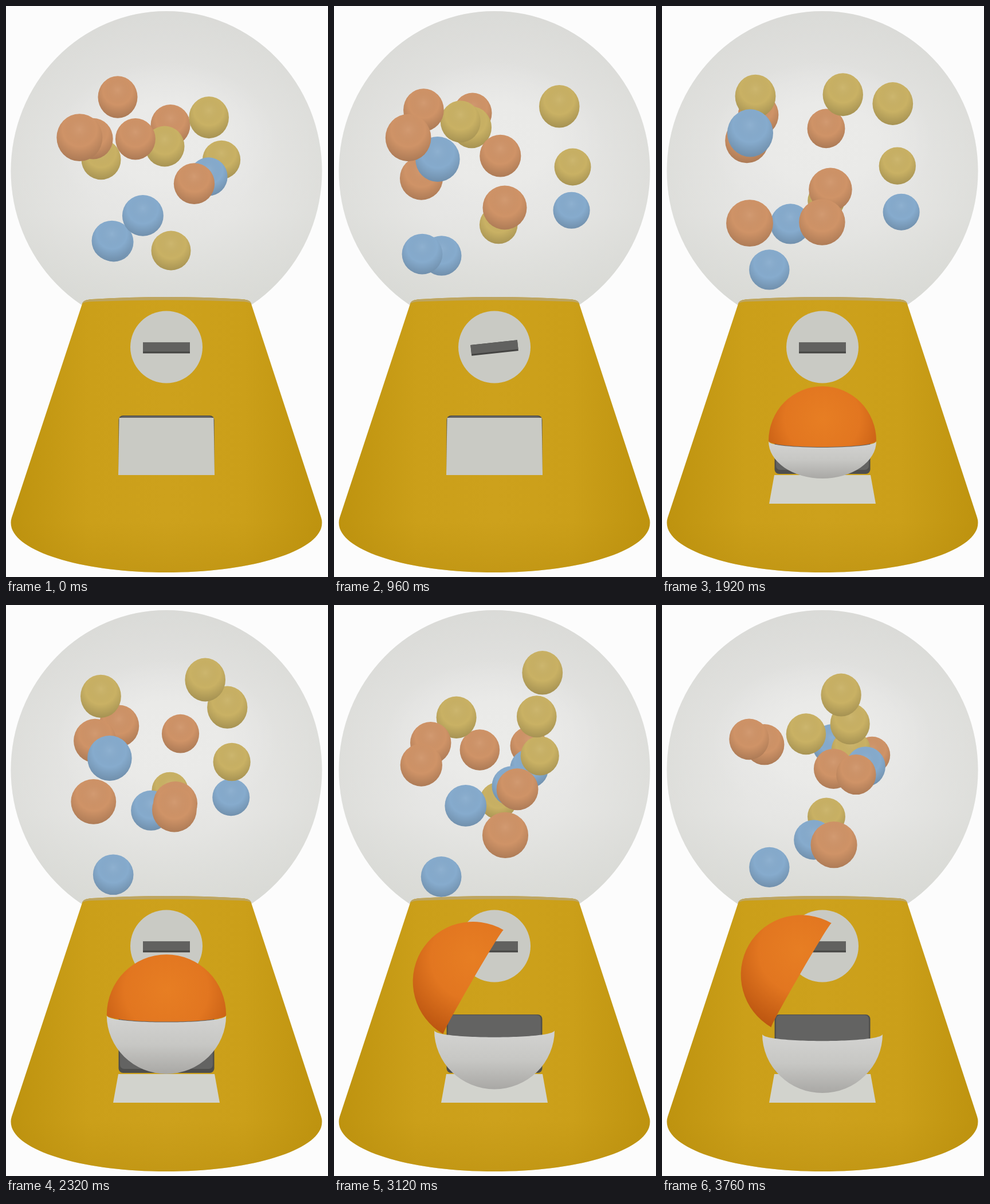
These frames come from a looping animation (562 px wide and 997 px high, 3840 ms). An HTML page with a canvas:

```html
<!DOCTYPE html>
<html lang="en">
<head>
<meta charset="utf-8">
<title>Gumball machine</title>
<style>
  html, body { margin: 0; width: 100%; height: 100%; overflow: hidden; background: #fcfcfc; }
  canvas { display: block; filter: blur(0.6px); }
</style>
</head>
<body>
<canvas id="stage" width="562" height="997"></canvas>
<script>
const ctx = document.getElementById('stage').getContext('2d');
const LOOP = 3840, STEP = 80, CX = 280;
const ORANGE = '#cf9367', YELLOW = '#c9b164', BLUE = '#86abcd';

// A ball flies straight from the middle depth to a wall and back the same way.
// The wall sets its size there: turning time, place at the wall, place in the middle.
const MIDDLE = 34.5, SIDE = 35.5, FRONT = 41, BACK = 31.5;
const ball = (color, wall, turn, wallX, wallY, midX, midY) => ({ color, wall, turn, wallX, wallY, midX, midY });
const balls = [
  ball(ORANGE, FRONT, 1900, 153, 381, 152, 229),
  ball(ORANGE, FRONT, 1700, 271, 389, 341, 293),
  ball(ORANGE, FRONT, 3555, 301, 434, 287, 208),
  ball(ORANGE, FRONT, 450, 119, 227, 180, 244),
  ball(BLUE, FRONT, 1640, 134, 188, 269, 417),
  ball(ORANGE, SIDE, 1360, 127, 160, 305, 290),
  ball(YELLOW, SIDE, 1555, 418, 163, 325, 209),
  ball(YELLOW, SIDE, 2820, 388, 100, 166, 268),
  ball(YELLOW, SIDE, 2100, 152, 149, 277, 245),
  ball(BLUE, SIDE, 690, 134, 448, 361, 278),
  ball(BLUE, SIDE, 2790, 187, 483, 188, 412),
  ball(ORANGE, BACK, 3840, 370, 264, 195, 159),
  ball(YELLOW, BACK, 1370, 433, 286, 326, 253),
  ball(YELLOW, BACK, 2500, 286, 316, 288, 427),
  ball(BLUE, BACK, 1465, 445, 386, 291, 238)
];

const lerp = (a, b, k) => a + (b - a) * k;
const ramp = (t, a, b) => Math.min(1, Math.max(0, (t - a) / (b - a)));
const ease = (t, a, b) => { const k = ramp(t, a, b); return k * k * (3 - 2 * k); };

function blend(gradient, colors) {
  colors.forEach((c, i) => gradient.addColorStop(i / (colors.length - 1), c));
  return gradient;
}
const linear = (x0, y0, x1, y1, ...colors) => blend(ctx.createLinearGradient(x0, y0, x1, y1), colors);
const radial = (x, y, r, ...colors) => blend(ctx.createRadialGradient(x, y, 0, x, y, r), colors);

function fill(style, path) {
  ctx.fillStyle = style;
  ctx.fill(typeof path === 'string' ? new Path2D(path) : path);
}
function oval(x, y, rx, ry = rx) {
  const path = new Path2D();
  path.ellipse(x, y, rx, ry, 0, 0, 7);
  return path;
}
function box(x, y, w, h, r = 0) {
  const path = new Path2D();
  path.roundRect(x, y, w, h, r);
  return path;
}

// Perspective: position and size are mixed by the inverse of the radius.
function place({ color, wall, turn, wallX, wallY, midX, midY }, t) {
  const s = Math.abs(t - turn) / Math.max(turn, LOOP - turn);
  const near = (1 - s) / wall, far = s / MIDDLE, k = far / (near + far);
  return { color, x: lerp(wallX, midX, k), y: lerp(wallY, midY, k), r: 1 / (near + far) };
}

function drawGlobe(t) {
  const globe = oval(CX, 288, 271.5, 279);
  fill(linear(0, 9, 0, 540, '#dededc', '#e4e4e2', '#e6e6e4', '#dcddd9'), globe);
  fill(radial(CX, 270, 285, '#d4d5d000', '#d4d5d000', '#d4d5d077'), globe);
  ctx.save();
  ctx.translate(CX, 240);
  ctx.scale(1, 0.74);
  fill(radial(0, 0, 192, '#ebebe9', '#eaeae8', '#e8e8e700'), oval(0, 0, 192));
  ctx.restore();

  const placed = balls.map(b => place(b, t)).sort((a, b) => a.r - b.r);
  for (const { color, x, y, r } of placed) {
    const shape = oval(x, y, r, r * (1 + Math.max(0, 320 - y) * 0.0004));
    fill(color, shape);
    fill(radial(x, y - r * 0.35, r * 1.5, '#fff1', '#0000', '#0003'), shape);
  }
}

function drawBase() {
  const body = 'M133 520Q134 513 150 512Q280 504 412 512Q427 513 428 520L550 893Q553 902 550 912' +
    'C535 956 420 989 280 989S25 956 10 912Q7 902 10 893Z';
  fill(linear(9, 0, 551, 0, '#be930f', '#cb9f19', '#cda11c', '#cb9f19', '#be930f'), body);
  fill(linear(0, 900, 0, 989, '#b88d0e00', '#b88d0e77'), body);
  fill('#bda561', 'M133 520Q134 513 150 512Q280 504 412 512Q427 513 428 520Q424 516 410 516Q280 511 150 516Q137 516 133 520Z');
}

function drawDial(t) {
  fill('#c9cac4', oval(CX, 595.5, 63));
  const slot = (color, y, h) => {
    ctx.save();
    ctx.translate(CX, y);
    ctx.rotate(Math.PI * ease(t, 0, 1080));
    fill(color, box(-41, -h / 2, 82, h));
    ctx.restore();
  };
  slot('#444442', 597, 19);
  slot('#61615f', 595.5, 16);
}

function drawDoor(t) {
  fill('#4e4e4c', box(196.5, 715, 167, 102, 8));
  fill('#636362', box(199, 716, 162, 94, 7));

  const angle = Math.PI * 2 / 3 * ease(t, 1040, 1500);
  const edgeY = 819 - 100 * Math.cos(angle), edgeW = 82.5 + 10.5 * Math.sin(angle * 0.75);
  // The thick lower side shows while the flap is nearly level.
  const lift = Math.max(0, Math.cos(Math.min(Math.abs(angle - Math.PI / 2) * 3, Math.PI / 2)));
  const hingeY = 819 + 25 * lift, hingeW = 84 + 2 * lift;
  const color = lift > 0.3 ? linear(0, edgeY, 0, hingeY, '#d0d0cb', '#aaa9a2')
    : angle > 1.5 ? '#d2d3cd' : '#c9cac4';
  fill(color, `M${CX - edgeW} ${edgeY}H${CX + edgeW}L${CX + hingeW} ${hingeY}H${CX - hingeW}Z`);
}

function drawCapsule(t) {
  if (t < 1480) return;
  const out = ramp(t, 1440, 1920), rise = ease(t, 1920, 2400);
  const turn = ease(t, 2800, 3120), part = ease(t, 2800, 3240);
  const r = lerp(lerp(20, 94, out), 105, rise);
  const y = lerp(lerp(790, 757, out), 710, rise);
  const sag = r * 0.155;

  const rim = y + 3 + 36 * part;
  const bottom = Math.min(y + r + 1, 825) + 36 * part;
  const bowl = new Path2D();
  bowl.ellipse(CX, rim, r, bottom - rim, 0, 0, Math.PI);
  bowl.bezierCurveTo(CX - r, rim + sag, CX + r, rim + sag, CX + r, rim);
  fill(linear(0, rim, 0, bottom, '#d3d3d1', '#c7c7c4', '#a9a8a5'), bowl);

  // The cap turns, but its light stays upright.
  const tilt = -Math.PI / 3 * turn, bend = sag * (1 - 1.25 * turn);
  ctx.save();
  ctx.translate(lerp(CX, 242.5, turn), lerp(y + 1, 646, part));
  ctx.rotate(tilt);
  ctx.beginPath();
  ctx.ellipse(0, 1, r, r + 1, 0, Math.PI, 0);
  ctx.bezierCurveTo(r, 1 + bend, -r, 1 + bend, -r, 1);
  ctx.rotate(-tilt);
  ctx.fillStyle = radial(0, -r * 0.4, r * 1.4, '#e77e23', '#e27620', '#b9530f');
  ctx.fill();
  ctx.restore();
}

function draw(now) {
  const t = Math.floor(now % LOOP / STEP) * STEP;
  fill('#fcfcfc', box(0, 0, 562, 997));
  drawGlobe(t);
  drawBase();
  drawDial(t);
  drawDoor(t);
  drawCapsule(t);
}

const start = performance.now();
function tick() {
  draw(performance.now() - start);
  requestAnimationFrame(tick);
}
tick();
</script>
</body>
</html>
```
